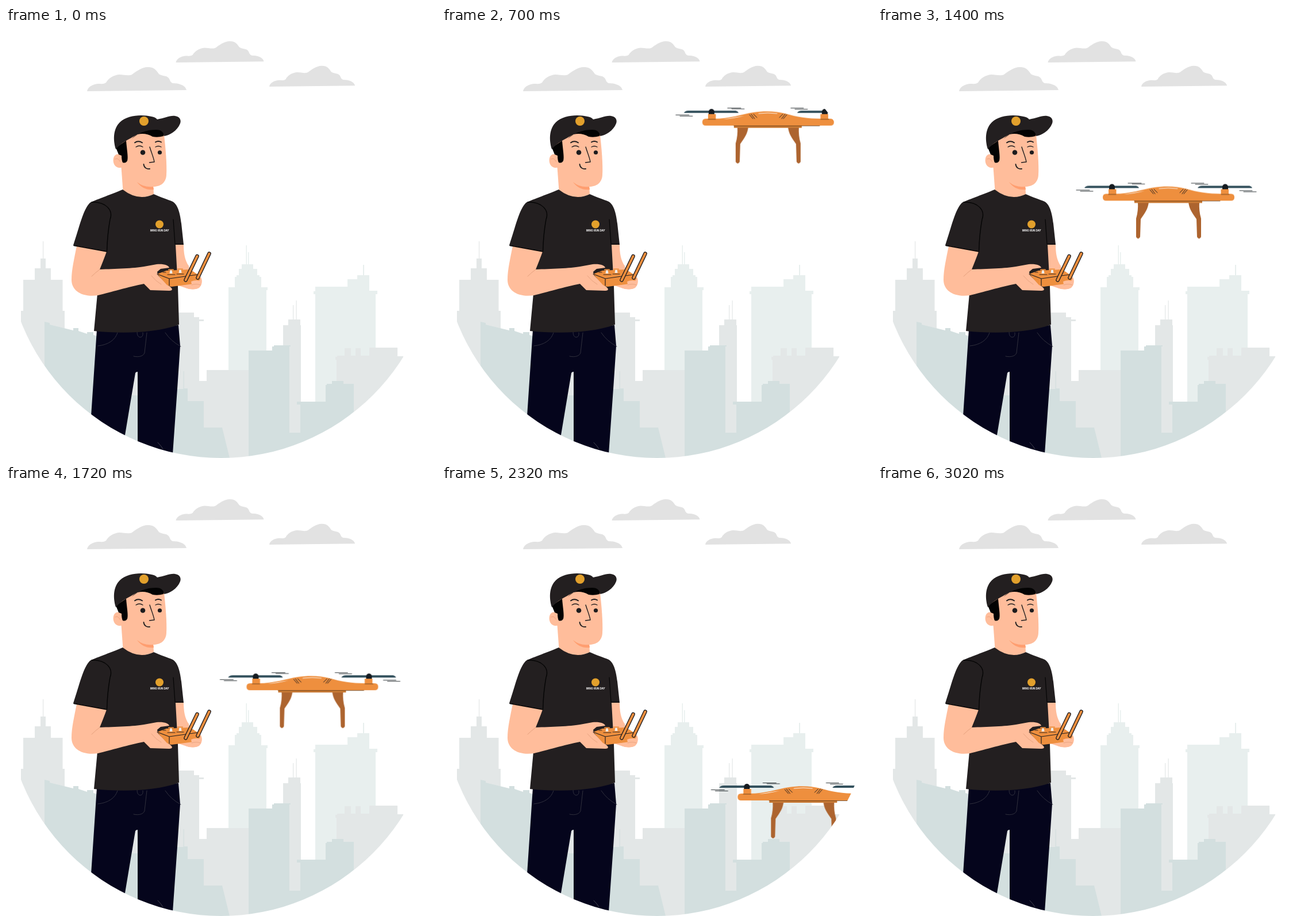
Write an HTML page with a canvas that moves like this. It is 748 px wide and 748 px high and loops after 3120 ms.

```html
<!DOCTYPE html>
<html lang="en">
<head>
<meta charset="utf-8">
<title>Drone pilot</title>
<style>
html, body { margin: 0; width: 100%; height: 100%; overflow: hidden; background: #fff; }
canvas { display: block; width: 748px; height: 748px; }
</style>
</head>
<body>
<canvas id="stage" width="748" height="748"></canvas>
<script>
const SIZE = 748, LOOP = 3120;
const ctx = document.getElementById('stage').getContext('2d');

const SKIN = '#ffbd9b', CLOTH = '#231f20', ORANGE = '#ee8f3e', GOLD = '#e2a02c';
const LIGHT = '#e8efee', MID = '#e3e7e7', DARK = '#d3dfdf';

function fill(g, color, d) {
  g.fillStyle = color;
  g.fill(new Path2D(d));
}

function line(g, color, width, d) {
  g.strokeStyle = color;
  g.lineWidth = width;
  g.stroke(new Path2D(d));
}

function disc(g, color, x, y, r) {
  g.fillStyle = color;
  g.beginPath();
  g.arc(x, y, r, 0, Math.PI * 2);
  g.fill();
}

function layer(paint) {
  const c = document.createElement('canvas');
  c.width = c.height = SIZE;
  const g = c.getContext('2d');
  g.lineCap = g.lineJoin = 'round';
  paint(g);
  return c;
}

function cloud(g, x, y, s) {
  g.save();
  g.translate(x, y);
  g.scale(s, s);
  fill(g, '#e2e2e2', `M0 43C1 36 9 31 19 30C25 30 29 31 33 28C37 21 45 15 56 14
    C65 14 71 17 78 14C85 9 95 1 106 1C117 1 120 6 125 13C130 17 138 15 142 20
    C145 24 144 27 149 29C159 29 171 32 173 41Z`);
  g.restore();
}

function city(g) {
  fill(g, LIGHT, `M387 748V458V451H398V433H401V430H405V419H410V411H417.5V378H419V411H421V390H422.5V411H430
    V419H437V430H441V433H444V451H455V456H453V748Z`);
  fill(g, LIGHT, `M538 748V463H535V458H538V450H594V437H611V430H621V412H623V430H632V457H646V463H643V748Z`);
  fill(g, MID, `M26 748V492H30V438H50V418H60V401H64V371H65.2V401H69V418H78V438H98.500V492H102V748Z`);
  fill(g, MID, 'M200 748V495H327V503H336V507H344V510H336V614H349V595H423V748Z');
  fill(g, MID, 'M482 748V517H491V507H499V482H500.200V507H504.500V474H505.700V507H512V517H513V748Z');
  fill(g, MID, `M575 748V577H573V572H576V570H589V557H600V570H608V557H617V570H623V570H632V556H681V571H691L700 748Z`);
  fill(g, DARK, `M67 748V511L76 513V516L117 526V522H126V527L141 532V529H152V534L158 536V748Z`);
  fill(g, DARK, 'M200 748V639H290V628H308.500V597H309.700V627H316V649H344V695H376L389 748Z');
  fill(g, DARK, `M422 748V561H463V554H466V552H495V554H493V704H512V655H506V650H556V621H558V619H567V614H587V619H605V748Z`);
}

function trousers(g) {
  fill(g, '#05051c', `M158 525L300 517L303 553L298.500 620L289.500 748H229V598Q226 598 225 600
    L205 720L147 690Z`);
  const seam = '#30303d';
  line(g, seam, 1, 'M194 530C190 543 178 551 160 553');
  line(g, seam, 1, 'M245 530L241 565C239 571 231 573 222 571');
  line(g, seam, 1, 'M228 529Q228 538 234 538Q239 537 238 530');
  line(g, seam, 1, 'M277 530Q287 545 304 554');
  line(g, '#4a4a55', 0.9, 'M264 721Q269 726 273 732');
}

function head(g) {
  fill(g, SKIN, 'M200 235L203.500 283Q230 302 257 289L256 270Z');
  fill(g, SKIN, 'M198 203L222 178H274C278 210 280 238 279 256C278 270 268 276 256 276C232 275 204 262 200 240Z');
  fill(g, SKIN, 'M200 221C190 216 185 225 187 234C189 242 196 245 203 242Z');
  line(g, '#e99a76', 0.8, 'M190 228Q195 225 198 232');
  fill(g, '#ff9e70', 'M228 268Q240 278 256 276L257 281Q239 283 228 268Z');

  fill(g, '#030303', 'M191 208L209 196C210 210 213 225 211 231Q208 236 203 234Q201 230 201 222L196 220Z');
  fill(g, '#030303', 'M218 193C232 180 252 172 270 177L276 182L274 188Q264 191 255 189Q243 182 229 185Z');
  fill(g, CLOTH, `M191 211C185 191 188 174 198 164C211 151 237 150 253 154Q260 155 263 159
    C276 157 284 152 294 153C303 154 305 161 303 166C298 179 284 187 275 188
    C274 181 270 177 262 177C240 176 224 188 209 196Q197 203 191 211Z`);
  disc(g, GOLD, 240, 162, 8);

  const ink = '#1d1c1e';
  line(g, ink, 2, 'M224 199.500Q230 195 237 199.500M260 198.500Q265 195.500 270 198.500');
  line(g, ink, 1.3, 'M226 207Q232 203 238 207M260 207Q265 204 270 207');
  disc(g, ink, 238, 216.500, 4.3);
  disc(g, ink, 267.500, 216.500, 3.6);
  line(g, ink, 1.4, 'M250 207C253 217 257 226 258 233L249.500 234');
  line(g, ink, 1.8, 'M239.500 237C240 243 245 246 250 245');
}

function shirt(g) {
  fill(g, SKIN, 'M290 376H309C309 392 311 404 318 414L322 431L337 431C342 436 342 444 338 449C335 455 325 456 312 452L294 446Z');
  fill(g, CLOTH, `M203 281Q230 302 257 289C270 295 281 298 290 302C300 308 303 325 305 340L309 377H295
    L299 450L301 516C260 531 200 532 153 527L163 419L170 389L117 378
    C128 345 134 316 146 304C158 298 187 288 203 281Z`);
  disc(g, GOLD, 267, 341.500, 7);
  g.fillStyle = '#fff';
  g.font = 'italic bold 4.4px Inter, "Liberation Sans", sans-serif';
  g.textAlign = 'center';
  g.fillText('WING RUN DAY', 267, 354);
}

function antenna(g, x1, y1, x2, y2) {
  const d = `M${x1} ${y1}L${x2} ${y2}`;
  line(g, CLOTH, 6.6, d);
  line(g, ORANGE, 4, d);
}

function stick(g, x, y) {
  fill(g, '#eeeeee', `M${x - 1.5} ${y}h3l1 6h-5z`);
  line(g, ORANGE, 2, `M${x - 4} ${y - 0.5}h8`);
}

function arms(g) {
  fill(g, SKIN, `M123 379L175 389Q170 403 163 420C190 419 223 418 240 415L262 411C275 410 283 413 284 417
    L269 419L263 424L264 430L284 449C290 453 291 457 284 457L251 456L240 445C215 450 180 460 160 465
    C132 469 114 457 114 438C114 420 119 400 123 379Z`);
  line(g, '#e39d7a', 0.9, 'M149 432Q155 426 163 420');
  line(g, '#050505', 1.4, 'M149 303C174 302 187 317 181 333C177 355 176 370 175.500 389L118 378.500');
  line(g, '#050505', 1.2, 'M291 333L294 376H308');
  fill(g, ORANGE, 'M263 428L279 422L320 420L334 429L338 436L334 444L288 450Q282 449 279 446Z');
  line(g, CLOTH, 1.2, 'M263 428L284 436L333 429M284 436V448');
  line(g, CLOTH, 0.9, 'M281 429H294M297 428H309M273 425H278');
  stick(g, 287, 421);
  stick(g, 303, 420);
  fill(g, SKIN, 'M322 441Q331 437 340 441Q341 447 336 452Q324 457 312 452Q315 447 323 446Z');
  line(g, '#e39d7a', 0.8, 'M323 447Q331 444 338 447M253 431Q260 440 270 446');
  antenna(g, 312.500, 438.500, 332.500, 397);
  antenna(g, 333.500, 434.500, 353.500, 392.500);
}

// Drawn with the left rotor hub at 407, 194
function paintDrone(g) {
  const both = paint => {
    paint();
    g.save();
    g.translate(1011, 0);
    g.scale(-1, 1);
    paint();
    g.restore();
  };
  both(() => fill(g, '#ad642f', `M452 220H471C470 232 464 240 457 250L456 281Q452.500 287 449 281
    L449 249Q453 236 452 220Z`));
  fill(g, '#c97a35', 'M446 217H564V222H446Z');
  both(() => fill(g, ORANGE, 'M401 198H414.500V208H401Z'));
  fill(g, ORANGE, `M397 206H411C440 206 460 198 480 195C500 192 520 193 535 197C555 203 575 206 597 206H614
    Q620 206 620 212Q620 218 614 218H397Q391 218 391 212Q391 206 397 206Z`);
  line(g, '#5a3414', 0.8, 'M446 218.500H595M401 207H414M597 207H611');
  fill(g, '#fff', 'M427 207Q445 206 464 201Q446 204 427 207Z');
  line(g, '#fff', 0.9, 'M489 197Q505 195 521 197');
  both(() => line(g, CLOTH, 1, 'M473 199L479 206M476 198L482 206M480 198L486 204'));
  for (const x of [407, 604]) {
    fill(g, '#35525e', `M${x - 48} 196Q${x - 46} 192 ${x - 40} 192H${x + 42}Q${x + 46} 193 ${x + 47} 196Z`);
    fill(g, '#151b20', `M${x - 5} 198V194A5 5 0 0 1 ${x + 5} 194V198Z`);
  }
  line(g, '#20272b', 0.9, `M345 199.500H368M352 201.500H374M435 187.500H458M442 189H464
    M545 187.500H567M552 189.500H574M629 200.500H651M636 202.500H658`);
}

// Pictures change in steps of 100 ms, with one long and one short hold
function stepAt(t) {
  if (t < 1400) return Math.floor(t / 100);
  if (t < 1600) return 14;
  if (t < 2020) return Math.floor(t / 100) - 1;
  return 20 + Math.floor((t - 2020) / 100);
}

function hermite(a, b, va, vb, u) {
  const w = 1 - u;
  return a * w * w * (1 + 2 * u) + b * u * u * (3 - 2 * u) + va * u * w * w - vb * u * u * w;
}

// Straight descent to the left, a rounded turn, then straight out to the right
function hubAt(n) {
  const vx1 = -20.6, vy1 = 16.1, vx2 = 13.7, vy2 = 27.4;
  if (n <= 10) return [407 + (n - 10) * vx1, 194 + (n - 10) * vy1];
  if (n >= 14) return [407 + (n - 14) * vx2, 276.4 + (n - 14) * vy2];
  const u = (n - 10) / 4;
  return [hermite(407, 407, vx1 * 4, vx2 * 4, u), hermite(194, 276.4, vy1 * 4, vy2 * 4, u)];
}

const scene = layer(g => {
  cloud(g, 141, 67, 1);
  cloud(g, 295.500, 22, 0.885);
  cloud(g, 458, 65, 0.862);
  city(g);
  trousers(g);
  head(g);
  shirt(g);
  arms(g);
});
const drone = layer(paintDrone);

function draw(now) {
  const [x, y] = hubAt(stepAt(now % LOOP));
  ctx.fillStyle = '#fff';
  ctx.fillRect(0, 0, SIZE, SIZE);
  ctx.save();
  ctx.beginPath();
  ctx.arc(SIZE / 2, SIZE / 2, SIZE / 2, 0, Math.PI * 2);
  ctx.clip();
  ctx.drawImage(scene, 0, 0);
  ctx.drawImage(drone, x - 407, y - 194);
  ctx.restore();
}

const start = performance.now();
function tick() {
  draw(performance.now() - start);
  requestAnimationFrame(tick);
}
tick();
</script>
</body>
</html>
```
